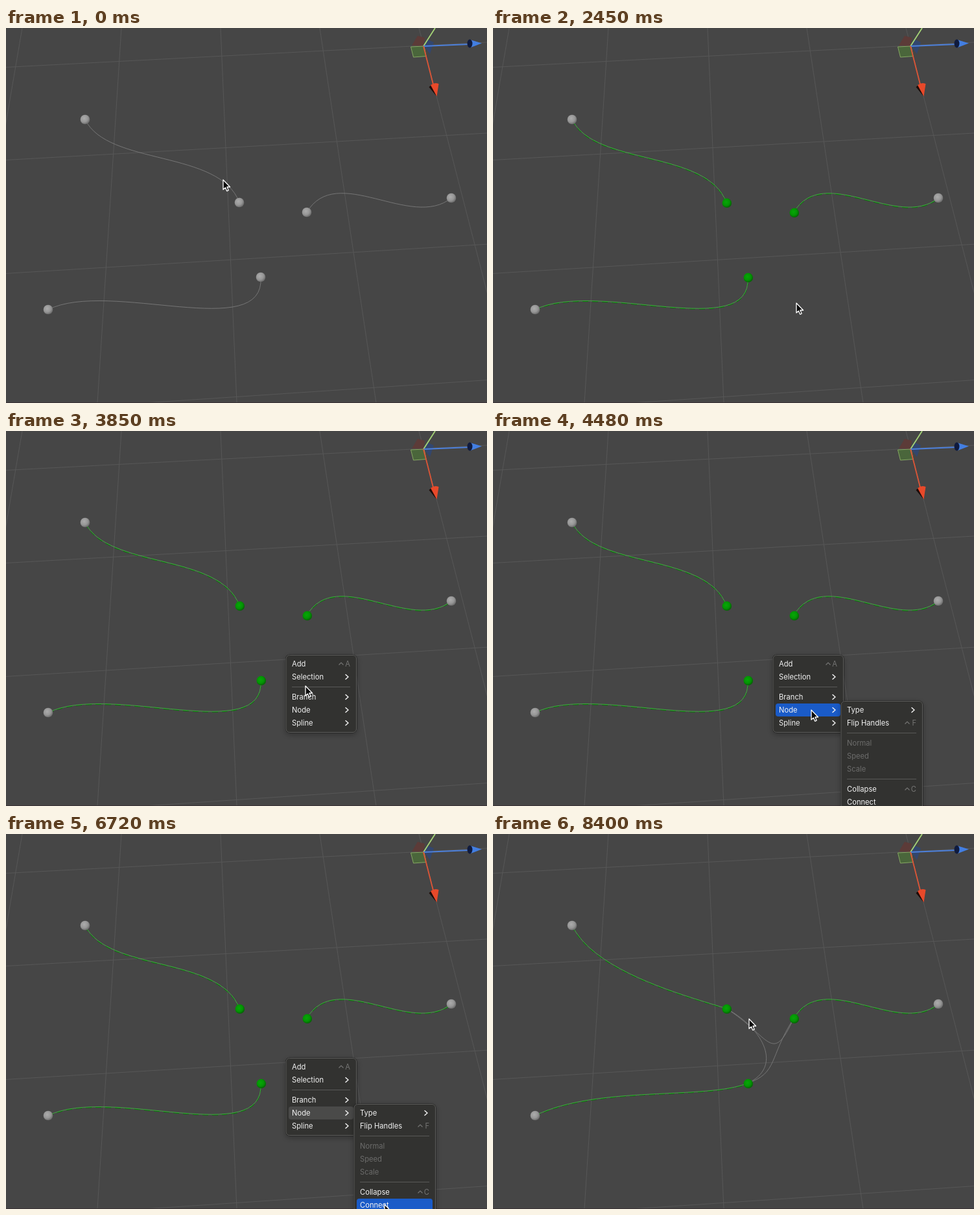
An HTML page that plays this animation: 742 by 578 pixels, repeating every 8.47 s.

```html
<!DOCTYPE html>
<html lang="en">
<head>
<meta charset="utf-8">
<title>Connecting spline nodes</title>
<style>
html, body { margin: 0; width: 100%; height: 100%; overflow: hidden; background: #464646; }
svg { display: block; width: 742px; height: 578px; }
text { font: 400 11.2px Inter, sans-serif; fill: #f2f2f2; }
.dim { fill: #757574; }
.off { fill: #6c6c6b; }
.grid { stroke: #575757; }
.wire { fill: none; stroke: #7b7b7b; stroke-width: .9; }
.glow { fill: none; stroke: #077207; stroke-width: 1.1; stroke-dasharray: 9 6; }
.live { fill: none; stroke: #45b245; stroke-width: .9; }
.rule { stroke: #595958; }
.arrow { fill: none; stroke: #f2f2f2; stroke-width: 1.5; stroke-linecap: round; stroke-linejoin: round; }
.caret { fill: none; stroke: #757574; stroke-width: 1.2; }
</style>
</head>
<body>
<svg viewBox="0 0 742 578" xmlns="http://www.w3.org/2000/svg">
  <defs>
    <radialGradient id="gray" cx=".4" cy=".38" r=".65">
      <stop offset="0" stop-color="#acacac"/><stop offset=".6" stop-color="#969696"/><stop offset="1" stop-color="#686868"/>
    </radialGradient>
    <radialGradient id="green" cx=".42" cy=".4" r=".65">
      <stop offset="0" stop-color="#06a806"/><stop offset=".55" stop-color="#049504"/><stop offset="1" stop-color="#055a05"/>
    </radialGradient>
    <filter id="shade" x="-20%" y="-20%" width="140%" height="140%">
      <feDropShadow dx="0" dy="3" stdDeviation="4" flood-opacity=".28"/>
    </filter>
  </defs>
  <rect width="742" height="578" fill="#464646"/>
  <path id="grid" class="grid"/>
  <rect y="577" width="742" height="1" fill="#3b3336"/>

  <g id="gizmo">
    <path d="M626 27L635 12L646 15L644 28Z" fill="#5c3b38"/>
    <path d="M645 28L651 18L660 22L654 40Z" fill="#33466d"/>
    <path d="M624.500 29L645 28L648 43.500L628.500 45Z" fill="#4a663b" stroke="#86a863"/>
    <path d="M644 28L662 0" stroke="#a5d477" stroke-width="1.800"/>
    <path d="M644 28L714 25" stroke="#4c80dc" stroke-width="1.800"/>
    <path d="M716 18L734 23.500L717 30Z" fill="#437fe2"/>
    <ellipse cx="715.500" cy="24" rx="4" ry="6.500" fill="#101b3e"/>
    <path d="M644 28L659 87" stroke="#dd5536" stroke-width="1.800"/>
    <path d="M652.500 91L657 87L664 105Z" fill="#1c0b08"/>
    <path d="M655 88Q661 83 667.500 86L664.500 105.500Z" fill="#e8492a"/>
  </g>

  <g id="wires"></g>
  <g id="nodes"></g>
  <rect id="box" fill="#2f2f2f" fill-opacity=".4"/>
  <g id="menu"></g>
  <g id="sub"></g>
  <g id="pointer">
    <g id="ring" fill="none">
      <circle r="20.700" stroke="#cfcfcf" stroke-width="3"/>
      <circle r="20.700" stroke="#303030" stroke-width="1.500"/>
    </g>
    <path d="M0 0V15L3.400 11.900L5.700 17.300L8.200 16.200L5.900 11H10.600Z" fill="#080808" stroke="#fff" stroke-width="1.300" stroke-linejoin="round"/>
  </g>
</svg>
<script>
const LOOP = 8470, STEP = 70;
const PRESS = 1190, DRAG = 1400, RELEASE = 2170, RIGHT_CLICK = 3080, MENU = 3150, SUB = 4410;
const ENTER_SUB = 4900, CLICK = 6790, JOIN = 6930, MENU_GONE = 7070;
const $ = id => document.getElementById(id);
const show = (el, on) => el.setAttribute('display', on ? 'inline' : 'none');
const mix = (a, b, k) => a + (b - a) * k;
const easeOut = k => 1 - (1 - k) ** 2;

// Cursor moves: begin, end, then the place reached
const home = [335, 234], anchor = [327, 230];
const moves = [
  [420, 770, 351, 234], [910, PRESS, ...anchor],
  [1330, 1540, 463, 413], [1540, 1750, 514, 454],
  [2240, 2450, 468, 424], [2450, 2800, 416, 307], [3010, RIGHT_CLICK, 428, 328],
  [3430, 3850, 462, 393], [3850, 4340, 465, 428], [4340, 4620, 500, 430],
  [4830, 5180, 610, 492], [5180, 5670, 590, 570], [6160, 6720, 584, 571],
  [6720, 7140, 558, 535], [7770, 7980, 453, 353], [8190, 8400, 395, 285]
];

function cursorAt(t) {
  let [x, y] = home;
  for (const [begin, end, toX, toY] of moves) {
    if (t <= begin) break;
    const k = easeOut(Math.min(1, (t - begin) / (end - begin)));
    x = mix(x, toX, k);
    y = mix(y, toY, k);
  }
  return [Math.round(x), Math.round(y)];
}

// Evenly spaced columns, and rows that spread out towards the viewer
function gridPath() {
  let d = '';
  for (let i = 0; i < 5; i++) d += `M${25 + 153 * i} 0L${215 * i - 74} 578`;
  for (let i = 0, spread = 0; i < 4; i++) {
    d += `M0 ${60.5 + 143 * spread}L742 ${22 + 140 * spread}`;
    spread += 1.223 ** i;
  }
  return d;
}

const outer = { a: [122, 141], b: [687, 262], c: [65, 434] };
const inner = { a: [360, 269], b: [464, 284], c: [393, 384] };
const curve = (from, h1, h2, to) => `M${from}C${h1} ${h2} ${to}`;
const right = curve(inner.b, [510, 207], [625, 312], outer.b);
const loose = [
  curve(outer.a, [157, 213], [330, 187], inner.a), right,
  curve(outer.c, [160, 387], [400, 486], inner.c)
];
const joined = [
  curve(outer.a, [157, 213], [300, 250], inner.a), right,
  curve(outer.c, [160, 387], [330, 410], inner.c)
];
const links = [
  curve(inner.a, [428, 312], [430, 358], inner.b),
  curve(inner.a, [420, 302], [446, 360], inner.c),
  curve(inner.b, [425, 345], [440, 368], inner.c)
];

const wire = d => `<path class="wire" d="${d}"/>`;
const lit = d => `<path class="glow" d="${d}" transform="translate(0 1)"/><path class="live" d="${d}"/>`;
const ball = (paint, shift) => ([x, y]) =>
  `<circle cx="${x + shift}" cy="${y + shift}" r="7.3" fill="url(#${paint})"/>`;

let scene;
function setScene(next) {
  if (next === scene) return;
  scene = next;
  const idle = next === 'idle';
  const parts = idle ? loose.map(wire) :
    next === 'selected' ? loose.map(lit) : [...links.map(wire), ...joined.map(lit)];
  $('wires').innerHTML = parts.join('');
  $('nodes').innerHTML = [
    ...Object.values(outer).map(ball('gray', 0)),
    ...Object.values(inner).map(idle ? ball('gray', 0) : ball('green', .8))
  ].join('');
}

// Item suffix: '>' opens a menu, '-' is disabled, '^X' is a shortcut; '|' is a rule
const ROW = 20, GAP = 11;
function layout(x, y, w, h, labels) {
  const items = [], rules = [];
  let cy = y + 14;
  for (const entry of labels) {
    if (entry === '|') {
      rules.push(cy - 4.5);
      cy += GAP;
    } else {
      const [label, kind = ''] = entry.split(/(?=[>^-])/);
      items.push({ label, kind, cy });
      cy += ROW;
    }
  }
  return { x, y, w, h, items, rules };
}
const mainMenu = layout(431.5, 345, 109.5, 120, ['Add^A', 'Selection>', '|', 'Branch>', 'Node>', 'Spline>']);
const nodeMenu = layout(536.5, 416, 126.5, 190,
  ['Type>', 'Flip Handles^F', '|', 'Normal-', 'Speed-', 'Scale-', '|', 'Collapse^C', 'Connect']);
const find = (menu, label) => menu.items.find(item => item.label === label);

function buildMenu(el, { x, y, w, h, rules, items }) {
  const left = x + 9.5, edge = x + w - 10;
  const body = items.map(({ label, kind, cy }) => {
    let hint = '';
    if (kind === '>') hint = `<path class="arrow" d="M${edge - 7} ${cy - 3.5}l4 3.5l-4 3.5"/>`;
    if (kind[0] === '^') {
      hint = `<path class="caret" d="M${edge - 17.5} ${cy + 1.5}l3.5 -3.5l3.5 3.5"/>` +
        `<text class="dim" x="${edge}" y="${cy + 4}" text-anchor="end">${kind[1]}</text>`;
    }
    return `<text class="${kind === '-' ? 'off' : ''}" x="${left}" y="${cy + 4}">${label}</text>${hint}`;
  }).join('');
  el.innerHTML =
    `<rect x="${x - .5}" y="${y - .5}" width="${w + 1}" height="${h + 1}" rx="6.5" fill="#1c1c1c" filter="url(#shade)"/>` +
    `<rect x="${x + .5}" y="${y + .5}" width="${w - 1}" height="${h - 1}" rx="5.5" fill="#323230" stroke="#5d5d5b"/>` +
    `<rect class="mark" x="${x + 4.5}" width="${w - 9.5}" height="${ROW}" rx="4"/>` +
    rules.map(ry => `<path class="rule" d="M${left} ${ry}H${edge}"/>`).join('') + body;
}

function markItem(el, item, color) {
  const mark = el.querySelector('.mark');
  show(mark, !!item);
  if (!item) return;
  mark.setAttribute('y', item.cy - ROW / 2);
  mark.setAttribute('fill', color);
}

function itemAt({ x, w, items }, [px, py]) {
  if (px < x || px > x + w) return null;
  return items.find(({ cy, kind }) => kind !== '-' && Math.abs(py - cy) <= ROW / 2);
}

function updateMenus(t, tip) {
  const open = t >= MENU && t < MENU_GONE;
  const fade = t < JOIN ? 1 : (MENU_GONE - t) / (MENU_GONE - JOIN + STEP);
  show($('menu'), open);
  show($('sub'), open && t >= SUB);
  $('menu').setAttribute('opacity', fade);
  $('sub').setAttribute('opacity', fade);

  const blue = '#1a5bc8', inSub = t >= ENTER_SUB;
  markItem($('menu'), inSub ? find(mainMenu, 'Node') : itemAt(mainMenu, tip), inSub ? '#4a4a49' : blue);
  let hot = inSub ? itemAt(nodeMenu, tip) : null;
  // The chosen item blinks once
  if (t >= CLICK) hot = t < CLICK + STEP ? null : find(nodeMenu, 'Connect');
  markItem($('sub'), hot, blue);
}

function updateBox(t) {
  const dragging = t > DRAG && t < RELEASE;
  show($('box'), dragging);
  if (!dragging) return;
  // The box trails the cursor by one step
  const [x, y] = cursorAt(t - STEP);
  $('box').setAttribute('width', x - anchor[0]);
  $('box').setAttribute('height', y - anchor[1]);
}

function draw(ms) {
  const t = Math.floor((ms % LOOP + .01) / STEP) * STEP;
  const tip = cursorAt(t);
  const within = (a, b) => t >= a && t < b;
  setScene(t < RELEASE ? 'idle' : t < JOIN ? 'selected' : 'joined');
  updateBox(t);
  updateMenus(t, tip);
  show($('ring'), within(PRESS, RELEASE) || within(RIGHT_CLICK, MENU) || within(CLICK, CLICK + STEP));
  $('pointer').setAttribute('transform', `translate(${tip})`);
}

$('grid').setAttribute('d', gridPath());
$('box').setAttribute('x', anchor[0]);
$('box').setAttribute('y', anchor[1]);
buildMenu($('menu'), mainMenu);
buildMenu($('sub'), nodeMenu);
const start = performance.now();
function tick() {
  draw(performance.now() - start);
  requestAnimationFrame(tick);
}
tick();
</script>
</body>
</html>
```
